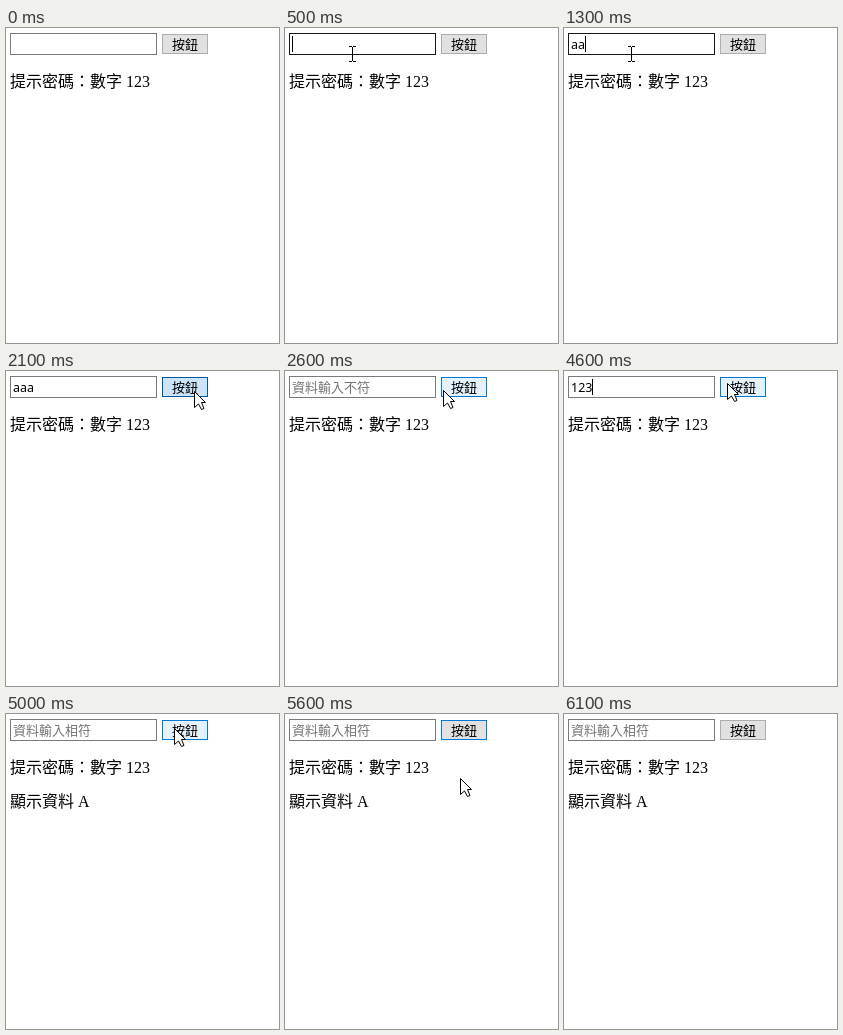
An HTML page with a canvas that plays this animation: 273 px wide and 315 px high, repeating every 6400 ms.

```html
<!DOCTYPE html>
<html lang="zh-Hant">
<head>
<meta charset="utf-8">
<style>
html, body { margin: 0; width: 100%; height: 100%; overflow: hidden; background: #fff; }
canvas { display: block; width: 273px; height: 315px; }
</style>
</head>
<body>
<canvas id="stage"></canvas>
<script>
const W = 273, H = 315, LOOP = 6400;
const CJK = '"Noto Sans CJK TC", "Noto Sans CJK", sans-serif';
const PAGE = '16px "Liberation Serif", ' + CJK;
const FIELD = '12.5px "Noto Sans", ' + CJK;
const HINT = '13px ' + CJK;

const canvas = document.getElementById('stage');
const dpr = window.devicePixelRatio || 1;
canvas.width = W * dpr;
canvas.height = H * dpr;
const ctx = canvas.getContext('2d', { alpha: false });
ctx.scale(dpr, dpr);

// Each track lists [start time, value]; a value holds until the next entry.
const pointer = [
  [0, null], [100, ['arrow', 157, 60]], [200, ['arrow', 110, 43]], [300, ['beam', 67, 26]],
  [1500, ['beam', 85, 28]], [1600, ['arrow', 113, 25]], [1700, ['arrow', 140, 25]],
  [1800, ['arrow', 168, 25]], [1900, ['arrow', 187, 25]], [2000, ['arrow', 188, 22]],
  [2100, ['arrow', 188, 20]], [2600, ['arrow', 158, 19]], [2700, ['beam', 134, 19]],
  [2800, ['beam', 118, 19]], [4400, ['beam', 136, 14]], [4500, ['arrow', 152, 13]],
  [4600, ['arrow', 163, 12]], [4700, ['arrow', 167, 13]], [4800, ['arrow', 168, 14]],
  [5400, ['arrow', 169, 27]], [5500, ['arrow', 173, 48]], [5600, ['arrow', 175, 64]],
  [5800, ['arrow', 195, 62]], [5900, ['arrow', 225, 50]], [6000, ['arrow', 252, 35]],
  [6100, null]
];
const typed = [
  [0, ''], [1300, 'aa'], [1400, 'aaa'], [2200, ''],
  [3700, '1'], [3800, '12'], [3900, '123'], [4900, '']
];
const hint = [[0, ''], [2200, '資料輸入不符'], [4900, '資料輸入相符']];
const caret = [
  [0, false], [500, true], [1000, false], [1300, true], [2000, false],
  [3000, true], [3400, false], [3700, true], [4800, false]
];
const border = [
  [0, '#7a7a7a'], [300, '#505050'], [500, '#171717'], [1600, '#7a7a7a'],
  [2700, '#171717'], [4500, '#7a7a7a']
];
const LOOKS = {
  normal: ['#e1e1e1', '#adadad'],
  hover: ['#e5f1fb', '#0078d7'],
  pressed: ['#cce4f7', '#005499'],
  focused: ['#e1e1e1', '#0078d7']
};
const button = [
  [0, 'normal'], [1800, 'hover'], [2000, 'pressed'], [2200, 'hover'],
  [2700, 'focused'], [3000, 'normal'], [4600, 'hover'], [4800, 'pressed'],
  [4900, 'hover'], [5400, 'focused'], [5800, 'normal']
];

function at(track, t) {
  let value;
  for (const [start, v] of track) {
    if (start > t) break;
    value = v;
  }
  return value;
}

function box(x, y, w, h, fill, line) {
  ctx.fillStyle = line;
  ctx.fillRect(x, y, w, h);
  ctx.fillStyle = fill;
  ctx.fillRect(x + 1, y + 1, w - 2, h - 2);
}

function text(str, x, y, font, color = '#000') {
  ctx.font = font;
  ctx.fillStyle = color;
  ctx.fillText(str, x, y);
}

function arrow(x, y) {
  const outline = [[0, 0], [0, 16], [4, 12.5], [7, 18], [9.5, 17], [7, 11], [11, 11]];
  ctx.beginPath();
  for (const [dx, dy] of outline) ctx.lineTo(x + dx + 0.5, y + dy + 0.5);
  ctx.closePath();
  ctx.fillStyle = '#fff';
  ctx.fill();
  ctx.strokeStyle = '#000';
  ctx.lineWidth = 1;
  ctx.stroke();
}

function beam(x, y) {
  ctx.fillStyle = '#000';
  ctx.fillRect(x, y - 7, 1, 14);
  for (const edge of [y - 8, y + 7]) {
    ctx.fillRect(x - 3, edge, 3, 1);
    ctx.fillRect(x + 1, edge, 3, 1);
  }
}

function draw(t) {
  ctx.fillStyle = '#fff';
  ctx.fillRect(0, 0, W, H);

  box(4, 5, 147, 22, '#fff', at(border, t));
  const value = at(typed, t);
  if (value) text(value, 7, 21, FIELD);
  else text(at(hint, t), 7, 21, HINT, '#757575');
  if (at(caret, t)) {
    ctx.fillStyle = '#000';
    ctx.fillRect(7 + 7 * value.length, 8, 1, 16);
  }

  box(156, 6, 46, 20, ...LOOKS[at(button, t)]);
  text('按鈕', 166, 21, HINT);

  text('提示密碼：數字 123', 4, 59, PAGE);
  if (t >= 5000) text('顯示資料 A', 4, 93, PAGE);

  const p = at(pointer, t);
  if (p) (p[0] === 'arrow' ? arrow : beam)(p[1], p[2]);
}

function tick() {
  draw(performance.now() % LOOP);
  requestAnimationFrame(tick);
}
tick();
</script>
</body>
</html>
```
